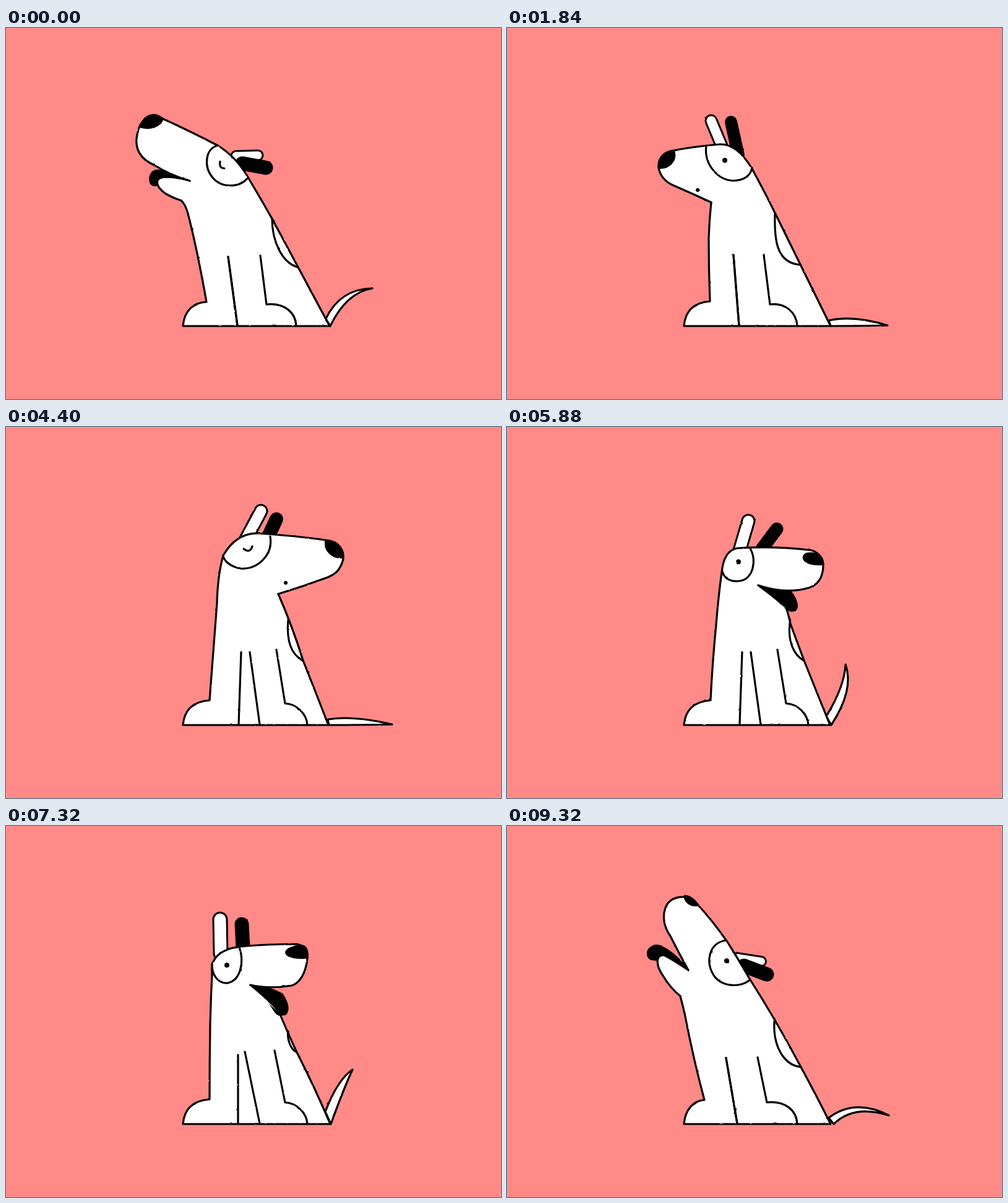
An HTML page with a canvas for the animation above (9.36 s loop, 800 by 600 pixels).

```html
<!DOCTYPE html>
<html>
<head>
<meta charset="utf-8">
<title>Dog</title>
<style>
  html, body { margin: 0; width: 100%; height: 100%; overflow: hidden; background: #ff8a88; }
  canvas { display: block; filter: url(#rough); }
  svg { position: absolute; }
</style>
</head>
<body>
<canvas id="stage" width="800" height="600"></canvas>
<svg width="0" height="0">
  <filter id="rough" color-interpolation-filters="sRGB">
    <feTurbulence id="grain" type="fractalNoise" baseFrequency=".13" numOctaves="2" seed="1"/>
    <feDisplacementMap in="SourceGraphic" scale="1.8" xChannelSelector="R" yChannelSelector="G"/>
  </filter>
</svg>
<script>
const LOOP = 9360, STEP = 40, LINE = 3.2;
const PINK = '#ff8a88', INK = '#000', WHITE = '#fff';
const ctx = document.getElementById('stage').getContext('2d');
const grain = document.getElementById('grain');

// Every part keeps the same path commands in all poses, so poses can be blended.
// size: pale ear width, dark ear width, mouth width.
const lowered = {
  torso: 'M283 279 Q290 285 294 300 Q309 358 324 443 C302 444 288 458 286 482 L523 482 Q478 398 432 312 Q414 280 392 243',
  jaw: 'M297 247 Q275 241 258 241 C236 242 244 258 258 268 Q270 275 283 279',
  tongue: 'M297 247 Q262 229 250 231 C232 226 228 250 238 254 C250 256 262 246 297 247',
  head: 'M392 243 Q372 208 342 190 Q300 168 254 147 C232 134 216 150 212 172 C206 200 222 214 240 222 Q268 239 297 247',
  nose: 'M218 160 C222 138 245 136 253 148 C248 160 232 164 218 160',
  patch: 'M342 190 C322 195 319 224 334 242 C348 259 378 259 391 242',
  spot: 'M430 308 C430 345 446 380 472 387',
  leg: 'M359 370 L374 481',
  gap: 'M359 370 L374 481',
  foot: 'M411 368 L421 447 C450 444 468 460 469 482',
  eye: 'M346 216 Q344 227 353 227',
  mouth: 'M270 243 L270.1 243',
  pale: 'M372 207 L407 206',
  dark: 'M382 219 L420 226',
  size: '18 23 0',
  tail: 'M517 470 Q540 422 592 421 Q550 428 524 482'
};
const happyLeft = {
  ...lowered,
  wag: true,
  torso: 'M315 296 Q317 312 318 330 Q323 390 328 442 C302 444 288 458 286 482 L525 482 Q479 392 433 300 Q417 268 401 237',
  jaw: 'M336 256 Q305 272 284 284 C278 290 290 298 300 298 Q308 298 315 296',
  tongue: 'M336 256 Q285 258 276 264 C262 276 252 290 256 302 C272 314 276 282 336 256',
  head: 'M401 237 Q394 214 384 199 Q310 199 246 206 C226 207 220 218 222 230 C224 248 232 256 246 256 Q290 259 336 256',
  nose: 'M222 222 C224 208 236 206 246 207 C244 219 234 223 222 222',
  patch: 'M340 200 C330 210 332 240 350 249 C368 259 392 256 401 237',
  spot: 'M433 300 C432 340 434 380 474 383',
  leg: 'M366 367 L375 481',
  gap: 'M366 367 L375 481',
  foot: 'M415 367 L425 447 C450 444 468 460 469 482',
  eye: 'M359 220 Q367 222 374 216',
  pale: 'M342 205 L320 168',
  dark: 'M371 202 L354 160',
  size: '19 22 0',
  tail: 'M515 462 Q516 410 502 386 Q532 425 526 481'
};
const quietLeft = {
  ...happyLeft,
  wag: false,
  torso: 'M330 282 Q327 310 326 340 Q326 390 328 442 C302 444 288 458 286 482 L523 482 Q479 392 435 303 Q415 262 395 226',
  jaw: 'M330 282 Q330 282 330 282 C330 282 330 282 330 282 Q330 282 330 282',
  tongue: 'M312 260 Q308 258 305 258 C302 260 302 262 304 264 C307 266 310 264 312 260',
  head: 'M395 226 Q372 188 345 188 Q300 192 270 198 C250 200 244 214 245 226 C248 242 258 250 270 255 Q300 268 330 282',
  nose: 'M245 226 C246 210 254 200 270 200 C274 214 262 228 245 226',
  patch: 'M322 190 C318 220 340 246 366 247 C384 246 394 238 396 226',
  eye: 'M345 210 Q352 214 360 207',
  mouth: 'M308 262 L308.1 262',
  pale: 'M350 198 L330 150',
  dark: 'M374 206 L362 152',
  size: '20 20 6',
  tail: 'M520 473 Q560 464 615 481 Q570 482 523 482'
};
const turning = {
  torso: 'M335 228 Q330 270 330 320 Q327 380 330 442 C302 444 288 458 286 482 L524 482 Q498 430 474 372 Q460 335 440 290',
  jaw: 'M440 290 Q440 290 440 290 C440 290 440 290 440 290 Q440 290 440 290',
  tongue: 'M435 268 Q440 266 445 266 C448 268 448 270 445 272 C440 274 437 272 435 268',
  head: 'M335 228 Q344 188 392 187 Q448 188 498 211 C516 216 524 230 520 240 C514 258 500 268 488 273 Q465 282 440 290',
  nose: 'M521 236 C522 208 496 204 490 222 C486 244 508 248 521 236',
  patch: 'M426 190 C424 225 390 246 362 245 C348 244 338 236 335 226',
  spot: 'M445 306 C444 335 448 368 475 377',
  leg: 'M373 367 L375 481',
  gap: 'M373 367 L375 481',
  foot: 'M423 368 L424 447 C450 444 468 460 469 482',
  eye: 'M366 228 Q382 230 393 206',
  mouth: 'M427 275 L443 269',
  pale: 'M365 195 L336 166',
  dark: 'M394 193 L364 161',
  size: '21 21 14',
  tail: 'M518 468 Q546 430 548 386 Q562 430 525 482'
};
const quietRight = {
  ...turning,
  torso: 'M351 208 Q342 240 341 285 Q336 355 329 442 C302 444 288 458 286 482 L521 482 Q501 430 481 380 Q462 320 440 270',
  jaw: 'M440 270 Q440 270 440 270 C440 270 440 270 440 270 Q440 270 440 270',
  tongue: 'M447 252 Q450 250 454 250 C457 251 457 253 454 255 C451 256 449 255 447 252',
  head: 'M351 208 Q372 171 408 172 Q470 176 517 183 C538 184 547 200 545 214 C540 232 532 238 520 243 Q480 258 440 270',
  nose: 'M544 211 C546 196 534 184 517 184 C514 198 526 212 544 211',
  patch: 'M427 177 C432 206 408 230 380 229 C362 226 352 216 351 208',
  spot: 'M456 312 C453 345 461 368 480 378',
  leg: 'M380 364 L376 481',
  gap: 'M394 364 L410 481',
  foot: 'M437 360 L451 447 C470 448 486 464 487 482',
  eye: 'M384 197 Q394 205 398 193',
  mouth: 'M452 252 L452.1 252',
  pale: 'M387 183 L412 136',
  dark: 'M424 177 L437 149',
  size: '22 22 6',
  tail: 'M520 473 Q560 466 624 481 Q570 482 522 482'
};
const happyRight = {
  ...quietRight,
  wag: true,
  torso: 'M347 236 Q342 270 338 320 Q332 380 329 442 C302 444 288 458 286 482 L522 482 Q501 430 481 380 Q466 340 458 318',
  jaw: 'M406 256 Q428 272 444 286 C450 290 452 294 453 298 Q456 308 458 318',
  tongue: 'M406 256 Q440 268 458 266 C466 276 472 290 466 296 C450 302 454 286 406 256',
  head: 'M347 236 Q350 200 372 196 Q430 192 490 199 C505 202 512 214 511 226 C510 246 500 256 488 260 Q450 271 406 256',
  nose: 'M511 222 C510 206 498 202 484 205 C472 212 484 224 511 222',
  patch: 'M393 196 C404 216 398 246 376 249 C360 251 350 244 348 233',
  spot: 'M457 318 C454 345 462 368 480 378',
  eye: 'M367 217 Q374 218 381 212',
  pale: 'M375 203 L390 152',
  dark: 'M412 197 L436 165',
  size: '22 21 0',
  tail: 'M516 468 Q546 420 548 384 Q562 425 524 482'
};
const upright = {
  ...happyRight,
  torso: 'M333 240 Q331 280 330 320 Q329 380 329 442 C302 444 288 458 286 482 L524 482 Q500 425 470 366 Q456 336 443 305',
  jaw: 'M395 257 Q416 274 430 288 C434 292 436 295 438 298 Q441 302 443 305',
  tongue: 'M395 257 Q425 260 446 272 C454 284 458 296 452 304 C428 312 440 286 395 257',
  head: 'M333 240 Q328 202 378 195 Q420 191 470 191 C484 193 488 204 487 215 C484 240 474 254 462 258 Q425 264 395 257',
  nose: 'M487 213 C488 198 484 192 472 194 C440 200 450 216 487 213',
  patch: 'M377 196 C386 222 378 250 358 254 C342 255 332 240 333 222',
  spot: 'M456 332 C454 345 460 360 468 365',
  leg: 'M375 370 L375 481',
  gap: 'M386 365 L410 481',
  foot: 'M434 363 L451 447 C470 448 486 464 487 482',
  eye: 'M350 224 Q357 225 364 219',
  pale: 'M347 206 L346 151',
  dark: 'M383 196 L381 159',
  size: '24 23 0',
  tail: 'M516 462 Q536 410 560 394 Q546 424 525 482'
};
const rising = {
  ...lowered,
  torso: 'M280 275 Q284 290 287 303 Q302 380 319 443 C302 444 288 458 286 482 L523 482 Q498 432 474 388 Q436 316 392 247',
  jaw: 'M293 233 Q268 216 254 209 C238 208 242 228 252 242 Q264 262 280 275',
  tongue: 'M293 233 Q268 202 246 194 C230 190 222 208 232 215 C244 218 260 214 293 233',
  head: 'M392 247 Q372 212 355 186 Q330 150 306 125 C290 108 264 114 257 130 C250 146 254 164 264 178 Q278 206 293 233',
  nose: 'M309 128 C302 118 294 113 287 113 C288 124 298 130 309 128',
  patch: 'M353 185 C326 190 320 220 335 243 C350 262 378 260 391 250',
  spot: 'M432 316 C430 355 446 386 475 390',
  leg: 'M354 375 L372 481',
  gap: 'M354 375 L372 481',
  foot: 'M405 374 L420 447 C450 444 468 460 469 482',
  eye: 'M348 216 Q355 218 362 212',
  pale: 'M372 213 L411 219',
  dark: 'M383 226 L420 240',
  size: '17 23 0',
  tail: 'M520 472 Q562 440 617 468 Q560 450 528 482'
};
const howling = { ...rising, tail: quietRight.tail };

const KEYS = [
  [0, lowered], [200, happyLeft], [1640, happyLeft], [1840, quietLeft], [2680, quietLeft],
  [2800, turning], [2960, quietRight], [5240, quietRight], [5480, happyRight], [6640, happyRight],
  [6880, upright], [7800, upright], [7960, howling], [9200, howling], [9320, rising], [LOOP, lowered]
];
const BLINKS = [[0, 120], [1680, 1800], [2720, 2920], [4360, 4520], [5280, 5400], [6680, 6800], [7840, 7960]];

const NUMBER = /-?[\d.]+/g;
function mix(a, b, u) {
  const goal = b.match(NUMBER);
  let i = 0;
  return a.replace(NUMBER, n => (+n + (goal[i++] - n) * u).toFixed(2));
}
const ease = u => u * u * (3 - 2 * u);

function wagTail(t) {
  const u = (1 - Math.cos((t - 920) / 346 * 2 * Math.PI)) / 2, bend = 0.77;
  return u < bend
    ? mix(happyLeft.tail, happyRight.tail, u / bend)
    : mix(happyRight.tail, upright.tail, (u - bend) / (1 - bend));
}

function poseAt(t) {
  const next = KEYS.findIndex(key => key[0] > t);
  const [t0, a] = KEYS[next - 1], [t1, b] = KEYS[next];
  const u = ease((t - t0) / (t1 - t0)), pose = {};
  const tail = p => p.wag ? wagTail(t) : p.tail;
  for (const part in lowered) pose[part] = mix(a[part], b[part], u);
  pose.tail = mix(tail(a), tail(b), u);
  return pose;
}

function fill(d, color) {
  ctx.fillStyle = color;
  ctx.fill(new Path2D(d));
}
function stroke(d, width = LINE, color = INK) {
  if (width < 0.5) return;
  ctx.lineWidth = width;
  ctx.strokeStyle = color;
  ctx.stroke(new Path2D(d));
}
function shape(d, color = WHITE) {
  fill(d, color);
  stroke(d);
}

function draw(t) {
  const p = poseAt(t);
  const [paleWidth, darkWidth, mouthWidth] = p.size.split(' ').map(Number);
  ctx.fillStyle = PINK;
  ctx.fillRect(0, 0, 800, 600);
  ctx.lineCap = ctx.lineJoin = 'round';

  shape(p.tail + 'Z');
  stroke(p.pale, paleWidth + 1);
  stroke(p.pale, paleWidth - 5, WHITE);
  stroke(p.dark, darkWidth);

  // The torso also covers the throat, up to the corner of the mouth.
  const [cornerX, cornerY] = p.jaw.match(NUMBER);
  const trunk = `${p.torso} L${cornerX} ${cornerY}Z`;
  fill(trunk, WHITE);
  stroke(trunk, 2, WHITE);
  stroke(p.torso);
  shape(p.tongue + 'Z', INK);
  shape(p.jaw);
  shape(p.head);
  shape(p.patch);
  [p.spot, p.leg, p.gap, p.foot].forEach(d => stroke(d));
  shape(p.nose + 'Z', INK);
  stroke(p.mouth, mouthWidth);

  if (BLINKS.some(([from, to]) => t >= from && t < to)) {
    stroke(p.eye);
  } else {
    const [, , x, y] = p.eye.match(NUMBER);
    ctx.fillStyle = INK;
    ctx.beginPath();
    ctx.arc(x, y, 4, 0, 2 * Math.PI);
    ctx.fill();
  }
}

const start = performance.now();
function tick() {
  const t = Math.floor((performance.now() - start) % LOOP / STEP) * STEP;
  grain.setAttribute('seed', 1 + Math.floor(t / 80) % 4);
  draw(t);
  requestAnimationFrame(tick);
}
tick();
</script>
</body>
</html>
```
